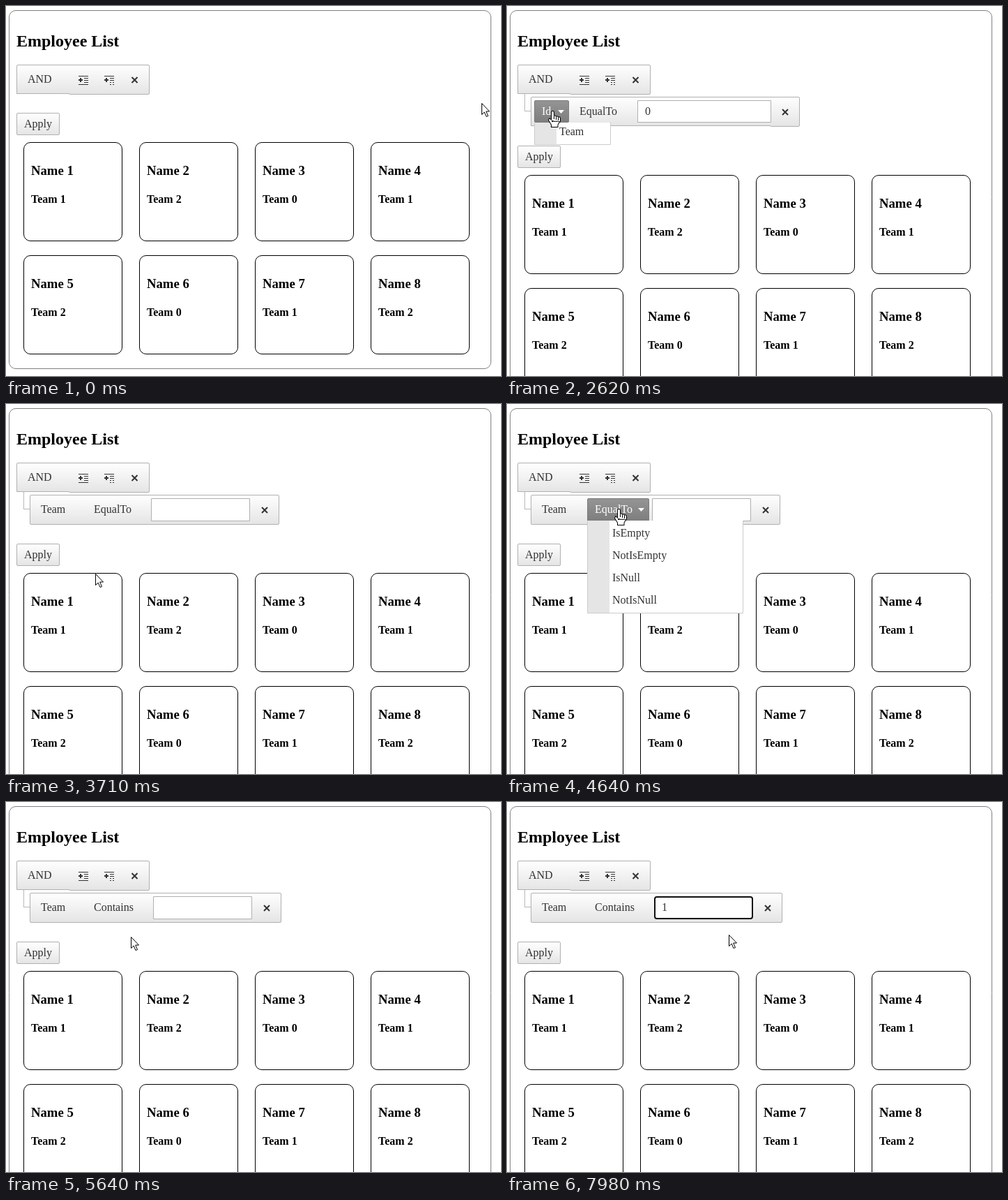
An HTML page with a canvas for the animation above (8000 ms loop, 710 px wide and 530 px high).

```html
<!DOCTYPE html>
<html lang="en">
<head>
<meta charset="utf-8">
<title>Employee List</title>
<style>
  html, body { margin: 0; width: 100%; height: 100%; overflow: hidden; background: #fff; }
  canvas { display: block; }
</style>
</head>
<body>
<canvas id="stage" width="710" height="530"></canvas>
<script>
const ctx = document.getElementById('stage').getContext('2d');
const LOOP = 8000;
const TICK = 77.4; // the screen refreshes on this clock; all times below are in ticks
const INK = '#333';
const EDGE = '#b0b0b0';

const ADDED = 21, FOCUSED = 79, TYPED = 92;

const fieldMenu = { x: 39, w: 110, open: 33, close: 48, items: ['Id', 'Name', 'Team'] };
const operatorMenu = {
  x: 115, w: 224, open: 59, close: 71,
  items: ['Contains', 'StartsWith', 'EndsWith', 'EqualTo', 'NotEqualTo', 'GreaterThan', 'LessThan',
    'GreaterThanOrEqualTo', 'LessThanOrEqualTo', 'IsEmpty', 'NotIsEmpty', 'IsNull', 'NotIsNull']
};
const labelWidths = { Id: 50, Team: 72, EqualTo: 89, Contains: 92 };

const stops = [
  { x: 682, y: 139, leave: 0, arrive: 0 },
  { x: 108, y: 107, leave: 4, arrive: 14 },
  { x: 65, y: 150, leave: 25, arrive: 31 },
  { x: 128, y: 243, leave: 36, arrive: 47 },
  { x: 160, y: 150, leave: 48, arrive: 57 },
  { x: 164, y: 195, leave: 61, arrive: 66 },
  { x: 168, y: 199, leave: 67, arrive: 69 },
  { x: 242, y: 158, leave: 71, arrive: 79 },
  { x: 470, y: 179, leave: 87, arrive: 98 },
  { x: 318, y: 190, leave: 101, arrive: 103 }
];

const between = (t, a, b) => t >= a && t < b;
const inside = (p, x, y, w, h) => between(p.x, x, x + w) && between(p.y, y, y + h);
const isOpen = (menu, t) => between(t, menu.open, menu.close);
const menuHeight = menu => menu.items.length * 32 + 6;
const toolButtons = [0, 1, 2].map(i => 95 + 37 * i);

function pointerAt(t) {
  const i = stops.findLastIndex(stop => t >= stop.leave);
  const to = stops[i], from = stops[Math.max(0, i - 1)];
  const u = Math.min(1, (t - to.leave) / (to.arrive - to.leave || 1));
  const s = (1 - Math.cos(Math.PI * u)) / 2;
  const dx = to.x - from.x;
  const sag = dx * dx * 5e-4 * s * (1 - s); // wide sweeps curve downwards
  return { x: Math.round(from.x + dx * s), y: Math.round(from.y + (to.y - from.y) * s + sag) };
}

function text(str, x, y, size = 16, color = INK, weight = 'normal') {
  ctx.font = `${weight} ${size}px "Liberation Serif", "Times New Roman", serif`;
  ctx.fillStyle = color;
  ctx.fillText(str, x, y);
}

function rect(color, x, y, w, h) {
  ctx.fillStyle = color;
  ctx.fillRect(x, y, w, h);
}

function box(x, y, w, h, radius, stroke, fill, line = 1) {
  ctx.beginPath();
  ctx.roundRect(x + line / 2, y + line / 2, w - line, h - line, Math.max(0, radius - line / 2));
  if (fill) { ctx.fillStyle = fill; ctx.fill(); }
  ctx.strokeStyle = stroke;
  ctx.lineWidth = line;
  ctx.stroke();
}

function shaded(stroke, top, bottom) {
  return (x, y, w, h) => {
    const fill = ctx.createLinearGradient(0, y, 0, y + h);
    fill.addColorStop(0, top);
    fill.addColorStop(1, bottom);
    box(x, y, w, h, 2, stroke, fill);
  };
}

const raised = shaded(EDGE, '#fff', '#e4e4e4');
const hovered = shaded('#999', '#dcdcdc', '#bebebe');
const pressed = shaded('#7d7d7d', '#959595', '#7d7d7d');

// Shortens the left part of a raised bar by one pixel
function notch(x, bottom, w) {
  rect('#fff', x, bottom - 1, w, 1);
  rect(EDGE, x + 1, bottom - 2, w - 1, 1);
}

function cross(cx, cy) {
  ctx.strokeStyle = INK;
  ctx.lineWidth = 2;
  ctx.beginPath();
  for (const d of [-4, 4]) {
    ctx.moveTo(cx - 4, cy - d);
    ctx.lineTo(cx + 4, cy + d);
  }
  ctx.stroke();
}

function addIcon(x, dotted, color) {
  rect(color, x, 100, 14, 1);
  rect(color, x, 105, 6, 2);
  rect(color, x + 2, 103, 2, 6);
  for (const y of [103, 106]) rect(color, x + 8, y, 6, 1);
  if (dotted) {
    for (const dx of [8, 12]) for (const y of [109, 112]) rect(color, x + dx, y, 2, 1);
  } else {
    rect(color, x + 8, 109, 6, 1);
    rect(color, x, 112, 14, 1);
  }
}

function drawToolbar(t, p) {
  raised(15, 84, 191, 43);
  notch(15, 127, 76);
  text('AND', 31, 110);
  const down = t === 18;
  const redrawn = between(t, ADDED, 26);
  for (const x of toolButtons) {
    if (!redrawn && inside(p, x, 89, 33, 33)) (down ? pressed : hovered)(x, 89, 33, 33);
  }
  addIcon(104, false, down ? '#fff' : INK);
  addIcon(141, true, INK);
  cross(184.5, 106);
}

function drawCards(shift) {
  raised(15, 153 + shift, 62, 32);
  text('Apply', 26, 174 + shift);
  for (let i = 0; i < 8; i++) {
    const x = 25 + 166 * (i % 4);
    const y = 195 + 162 * Math.floor(i / 4) + shift;
    box(x, y, 142, 142, 10, '#000');
    text(`Name ${i + 1}`, x + 11, y + 47, 18.72, '#000', 'bold');
    text(`Team ${(i + 1) % 3}`, x + 11, y + 87, 16, '#000', 'bold');
  }
}

function rowAt(t) {
  const numeric = t < fieldMenu.close;
  const field = numeric ? 'Id' : 'Team';
  const op = t < operatorMenu.close ? 'EqualTo' : 'Contains';
  const height = numeric ? 32 : 33;
  const fieldBox = { x: 39, y: 135, w: labelWidths[field], h: height };
  const opBox = { x: fieldBox.x + fieldBox.w + 4, y: 135, w: labelWidths[op], h: height };
  const inputX = opBox.x + opBox.w + 4;
  const input = { x: inputX + (numeric ? 1 : 0), y: 135, w: numeric ? 192 : 142, h: height };
  return { numeric, field, op, fieldBox, opBox, input, right: inputX + input.w + 42 };
}

const over = (p, b) => inside(p, b.x, b.y, b.w, b.h);

function menuButton(label, b, open, hover) {
  if (open) pressed(b.x, b.y, b.w, b.h);
  else if (hover) hovered(b.x, b.y, b.w, b.h);
  const color = open ? '#fff' : INK;
  text(label, b.x + 11, 156, 16, color);
  if (!open && !hover) return;
  const tip = b.x + b.w - 11;
  ctx.fillStyle = color;
  ctx.beginPath();
  ctx.moveTo(tip - 5, 149);
  ctx.lineTo(tip + 4, 149);
  ctx.lineTo(tip - 0.5, 154);
  ctx.fill();
}

function drawRow(t, p, row) {
  rect('#b8b8b8', 25, 126, 1, 25);
  rect('#b8b8b8', 25, 150, 9, 1);
  raised(34, 130, row.right - 34, 43);
  if (row.numeric) notch(34, 173, 344);
  menuButton(row.field, row.fieldBox, isOpen(fieldMenu, t), over(p, row.fieldBox));
  menuButton(row.op, row.opBox, isOpen(operatorMenu, t), over(p, row.opBox));
  cross(row.right - 21, 152);

  const { x, y, w, h } = row.input;
  const focused = t >= FOCUSED, typed = t >= TYPED;
  if (focused) box(x, y, w, h, 4, '#101010', '#fff', 2);
  else box(x, y, w, h, 0, EDGE, '#fff');
  const value = row.numeric ? '0' : typed ? '1' : '';
  text(value, x + 11, 156);
  const sinceInput = t - (typed ? TYPED : FOCUSED);
  if (focused && sinceInput % 14 < 7) rect('#222', x + 11 + 8 * value.length, 143, 1, 17);
}

function drawMenu(menu, t, p) {
  if (!isOpen(menu, t)) return;
  const { x, w, items } = menu;
  const h = menuHeight(menu);
  const shown = Math.min(1, (t - menu.open + 0.15) / 3.65);
  const top = 167 - Math.round((1 - shown) * h);
  ctx.save();
  ctx.beginPath();
  ctx.rect(x, 167, w, h);
  ctx.clip();
  rect('#fff', x, top, w, h);
  rect('#e5e5e5', x, top, 32, h);
  box(x, top, w, h, 0, '#ccc');
  items.forEach((item, i) => {
    const y = top + 3 + 32 * i;
    if (p.y >= 167 && inside(p, x, y, w, 32)) hovered(x + 3, y, w - 6, 32);
    text(item, x + 36, y + 21);
  });
  ctx.restore();
}

const cursors = {
  arrow() {
    ctx.translate(0.5, 0.5);
    ctx.beginPath();
    ctx.moveTo(0, 0);
    ctx.lineTo(0, 16);
    ctx.lineTo(3.7, 12.5);
    ctx.lineTo(6.5, 19);
    ctx.lineTo(9, 18);
    ctx.lineTo(6.2, 11.5);
    ctx.lineTo(11, 11.5);
    ctx.closePath();
    ctx.fillStyle = '#fff';
    ctx.fill();
    ctx.strokeStyle = '#000';
    ctx.lineWidth = 1;
    ctx.stroke();
  },
  hand() {
    const shape = new Path2D();
    for (let i = 0; i < 4; i++) {
      const top = i ? 6.5 + i : 1;
      shape.roundRect(3 * i - 1, top, 3, 16 - top, 1.2);
    }
    shape.moveTo(-1, 14);
    shape.lineTo(-4, 11.5);
    shape.lineTo(-5, 13.5);
    shape.lineTo(-1, 20);
    shape.lineTo(-1, 23);
    shape.lineTo(7.5, 23);
    shape.lineTo(7.5, 20);
    shape.lineTo(10.5, 15);
    shape.closePath();
    ctx.strokeStyle = '#000';
    ctx.lineWidth = 2;
    ctx.stroke(shape);
    ctx.fillStyle = '#fff';
    ctx.fill(shape);
    for (let i = 1; i < 4; i++) rect('#000', 3 * i - 1, 7 + i, 1, 4);
  },
  beam() {
    rect('#000', 0, -6, 1, 14);
    for (const y of [-7, 8]) for (const x of [-3, 1]) rect('#000', x, y, 3, 1);
  }
};

function cursorKind(t, p, row) {
  const overMenu = [fieldMenu, operatorMenu].some(menu =>
    isOpen(menu, t) && inside(p, menu.x, 167, menu.w, menuHeight(menu)));
  if (overMenu || toolButtons.some(x => inside(p, x, 89, 33, 33))) return 'hand';
  if (t < ADDED) return 'arrow';
  if (over(p, row.input)) return 'beam';
  return over(p, row.fieldBox) || over(p, row.opBox) ? 'hand' : 'arrow';
}

function draw(t) {
  const p = pointerAt(t);
  const row = rowAt(t);
  const added = t >= ADDED;
  const shift = added ? 47 : 0;
  rect('#fff', 0, 0, 710, 530);
  box(4, 6, 692, 514 + shift, 10, '#808080');
  text('Employee List', 15, 58, 24, '#000', 'bold');
  drawToolbar(t, p);
  drawCards(shift);
  if (added) drawRow(t, p, row);
  drawMenu(fieldMenu, t, p);
  drawMenu(operatorMenu, t, p);
  ctx.save();
  ctx.translate(p.x, p.y);
  cursors[cursorKind(t, p, row)]();
  ctx.restore();
}

function frame() {
  const now = performance.now() % LOOP;
  draw(Math.floor((now + 18) / TICK));
  requestAnimationFrame(frame);
}
frame();
</script>
</body>
</html>
```
